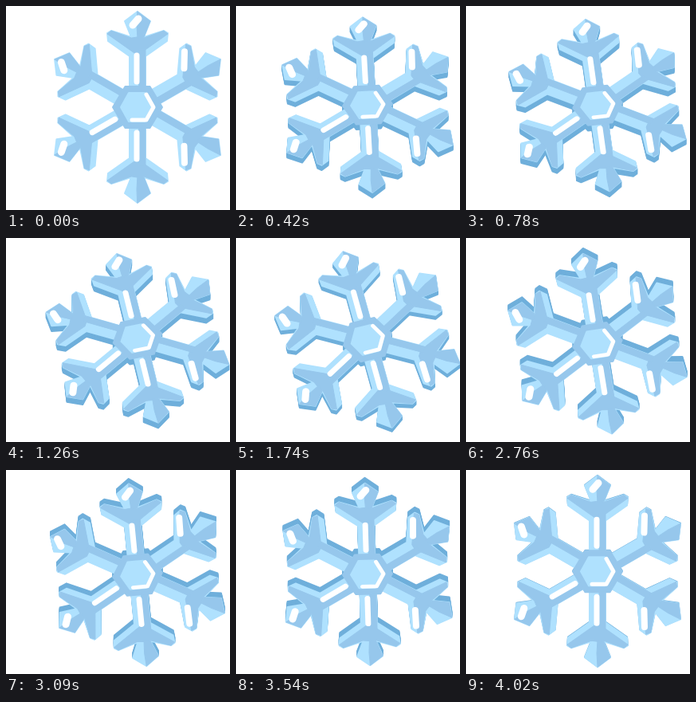
Animation of 281 by 256 pixels, one loop 4050 ms. Source, as an HTML page with a canvas:

```html
<!DOCTYPE html>
<html lang="en">
<head>
<meta charset="utf-8">
<title>Snowflake</title>
<style>
html, body { margin: 0; width: 100%; height: 100%; overflow: hidden; background: #fff; }
canvas { display: block; width: 281px; height: 256px; }
</style>
</head>
<body>
<canvas id="stage"></canvas>
<script>
const LOOP = 4050, STEP = 30, W = 281, H = 256, CX = 165, CY = 127;
const LIGHT = '#afe1fe', MID = '#96c7ec', DARK = '#6fafdb', WHITE = '#fff';

const canvas = document.getElementById('stage');
const ctx = canvas.getContext('2d');
const ratio = window.devicePixelRatio || 1;
canvas.width = W * ratio;
canvas.height = H * ratio;
ctx.lineJoin = ctx.lineCap = 'round';

function hexagon(rx, ry, x = 0) {
  const path = new Path2D();
  for (let i = 0; i < 6; i++) {
    const a = i * Math.PI / 3;
    path.lineTo(x + rx * Math.cos(a), ry * Math.sin(a) / Math.sin(Math.PI / 3));
  }
  path.closePath();
  return path;
}

// One arm points up from the centre; its outline is symmetric.
const mirrored = right =>
  right + right.split(' L').slice(1).reverse().map(p => ' L-' + p).join('') + 'Z';
const arm = new Path2D(mirrored('M0 -120 L16 -108 L8 -88 L33 -96 L38 -93 L37 -83 L10 -64 L10 -20'));
const branchShade = new Path2D(mirrored('M0 -88 L8 -87 L33 -96 L38 -92 L4 -68'));
const tipShade = new Path2D('M0 -120 L16 -108 L8 -88 L0 -86 L-1 -103Z');
const stemShade = new Path2D('M2 -72 H10 V-20 H2Z');
const tipShine = new Path2D('M1 -111 L-6 -103');
const branchShine = new Path2D('M-31 -86 L-13 -75');
const stemShine = new Path2D('M-1 -65 V-32');

const hub = hexagon(31, 26), core = hexagon(20, 18, -1);
const coreShine = new Path2D('M11 -16 L20 0 L11 16 L-7 16');

function fill(path, color, edge = 2) {
  ctx.fillStyle = ctx.strokeStyle = color;
  ctx.fill(path);
  ctx.lineWidth = edge;
  ctx.stroke(path);
}

function shine(path, width) {
  ctx.strokeStyle = WHITE;
  ctx.lineWidth = width;
  ctx.stroke(path);
}

function eachArm(draw) {
  for (let k = 0; k < 6; k++) {
    ctx.save();
    ctx.rotate(k * Math.PI / 3);
    draw(k);
    ctx.restore();
  }
}

function poseAt(t) {
  const p = t / LOOP, a = 2 * Math.PI * p;
  const tilt = Math.sin(a) + .2 * Math.sin(3 * a);
  const depth = 8 * tilt;
  return {
    turn: -14.8 * Math.sin(Math.PI * p ** .85) ** 2,
    y: CY - depth / 2 + 1.6 * (1 - Math.cos(a)),
    squash: 1 - tilt ** 2 * (.1 + .04 * tilt),
    depth
  };
}

function place({ turn, y, squash }, shift = 0) {
  ctx.setTransform(ratio, 0, 0, ratio, 0, 0);
  ctx.translate(CX, y + shift);
  ctx.scale(1, squash);
  ctx.rotate(turn * Math.PI / 180);
}

function drawSide(pose) {
  const layers = Math.ceil(Math.abs(pose.depth));
  for (let i = layers; i > 0; i--) {
    place(pose, pose.depth * i / layers);
    eachArm(() => fill(arm, DARK));
    fill(hub, DARK);
  }
}

function drawFace() {
  eachArm(k => {
    // Lower arms are flipped so that the light stays on the left.
    const lower = k > 1 && k < 5;
    ctx.scale(lower ? -1 : 1, 1);
    fill(arm, LIGHT);
    fill(branchShade, MID, 1);
    fill(tipShade, MID, 1);
    fill(stemShade, MID, 1);
    if (k === 0 || k > 3) shine(tipShine, 9);
    if (k === 1 || k === 2) shine(branchShine, 8);
    if (k === 0 || k === 3 || k === 4) shine(stemShine, 7);
  });
  fill(hub, MID);
  fill(core, LIGHT);
  shine(coreShine, 5);
}

function frame(now) {
  const pose = poseAt(Math.floor(now % LOOP / STEP) * STEP);
  ctx.setTransform(1, 0, 0, 1, 0, 0);
  ctx.fillStyle = WHITE;
  ctx.fillRect(0, 0, canvas.width, canvas.height);
  drawSide(pose);
  place(pose);
  drawFace();
}

const start = performance.now();
function tick() {
  frame(performance.now() - start);
  requestAnimationFrame(tick);
}
tick();
</script>
</body>
</html>
```
